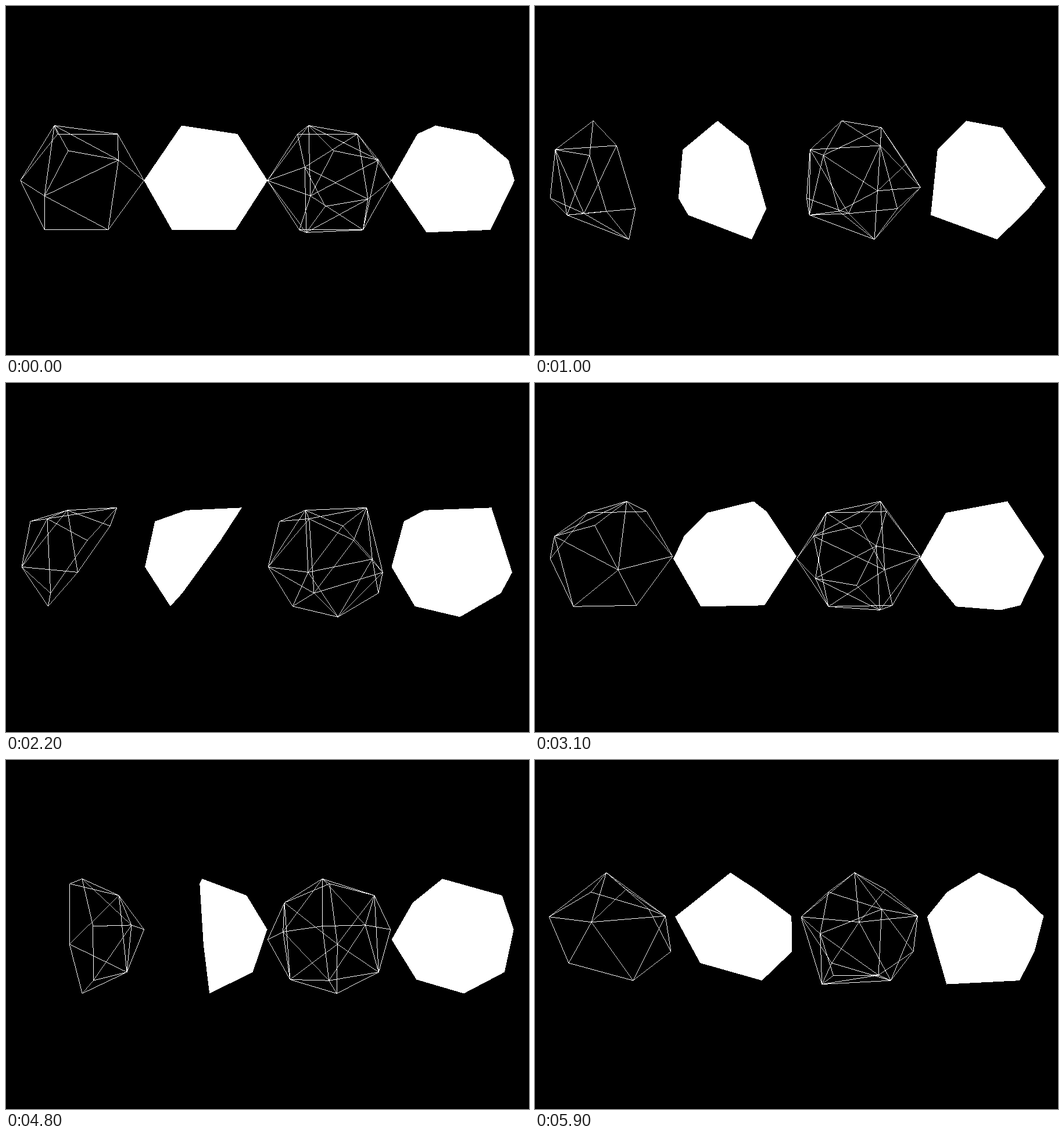
Write an HTML page that moves like this. It is 900 by 600 pixels and loops after 6000 ms.

```html
<!DOCTYPE html>
<html lang="en">
<head>
<meta charset="utf-8">
<title>Turning domes</title>
<style>
html, body { margin: 0; width: 100%; height: 100%; overflow: hidden; background: #000; }
svg { display: block; width: 900px; height: 600px; background: #000; shape-rendering: crispEdges; }
line { stroke: #fff; }
polygon { fill: #fff; }
</style>
</head>
<body>
<svg viewBox="0 0 900 600"></svg>
<script>
const LOOP = 6000, STEP = 100;
const FOCAL = 300 / Math.tan(12.5 * Math.PI / 180);
const DIST = 12.73, TILT = Math.atan(0.5);
const svg = document.querySelector('svg');

// Point on the unit sphere from azimuth and elevation in degrees
function onSphere(az, el) {
  const a = az * Math.PI / 180, e = el * Math.PI / 180;
  return [Math.cos(e) * Math.cos(a), Math.cos(e) * Math.sin(a), Math.sin(e)];
}

// Equator 0-5, then a ring of three and a pole for each half
const verts = [];
const edges = [];
for (let i = 0; i < 6; i++) {
  verts.push(onSphere(i * 60, 0));
  edges.push([i, (i + 1) % 6]);
}
for (const side of [1, -1]) {
  const base = verts.length, pole = base + 3;
  for (let i = 0; i < 3; i++) {
    const m = base + i;
    verts.push(onSphere(i * 120, side * 45));
    edges.push([m, base + (i + 1) % 3], [m, pole]);
    for (const k of [5, 6, 7]) edges.push([m, (i * 2 + k) % 6]);
  }
  verts.push([0, 0, side]);
}
const HALF = { verts: 10, edges: 21 };
const FULL = { verts: verts.length, edges: edges.length };

function add(tag) {
  return svg.appendChild(document.createElementNS('http://www.w3.org/2000/svg', tag));
}

const wire = (x, part) => ({ x, part, lines: edges.slice(0, part.edges).map(() => add('line')) });
const solid = (x, part) => ({ x, part, face: add('polygon') });
const shapes = [wire(-3, HALF), solid(-1, HALF), wire(1, FULL), solid(3, FULL)];

const rotX = ([x, y, z], a) => {
  const c = Math.cos(a), s = Math.sin(a);
  return [x, y * c - z * s, y * s + z * c];
};
const rotY = ([x, y, z], a) => {
  const c = Math.cos(a), s = Math.sin(a);
  return [x * c + z * s, y, z * c - x * s];
};

function project([x, y, z], offset) {
  const k = FOCAL / (DIST - z);
  return [450 + (x + offset) * k, 300 - y * k];
}

function hull(points) {
  const sorted = points.slice().sort((a, b) => a[0] - b[0] || a[1] - b[1]);
  const chain = list => {
    const out = [];
    for (const p of list) {
      while (out.length > 1) {
        const [a, b] = out.slice(-2);
        const turn = (b[0] - a[0]) * (p[1] - a[1]) - (b[1] - a[1]) * (p[0] - a[0]);
        if (turn > 0) break;
        out.pop();
      }
      out.push(p);
    }
    return out.slice(0, -1);
  };
  return [...chain(sorted), ...chain(sorted.reverse())];
}

// The width keeps a line one pixel thick along its minor axis
function setLine(el, [x1, y1], [x2, y2]) {
  const dx = Math.abs(x2 - x1), dy = Math.abs(y2 - y1);
  const width = Math.max(dx, dy) / (Math.hypot(dx, dy) || 1);
  const attrs = { x1, y1, x2, y2, 'stroke-width': width };
  for (const key in attrs) el.setAttribute(key, attrs[key].toFixed(3));
}

function draw(ms) {
  const angle = Math.floor((ms % LOOP) / STEP) * STEP / 1000;
  const turned = verts.map(v => rotX(rotY(v, -angle), angle - TILT));
  for (const { x, part, lines, face } of shapes) {
    const pts = turned.slice(0, part.verts).map(v => project(v, x));
    if (face) face.setAttribute('points', hull(pts).map(p => p.map(v => v.toFixed(3))).join(' '));
    else lines.forEach((el, i) => setLine(el, pts[edges[i][0]], pts[edges[i][1]]));
  }
}

function tick(now) {
  draw(now);
  requestAnimationFrame(tick);
}
draw(0);
requestAnimationFrame(tick);
</script>
</body>
</html>
```
